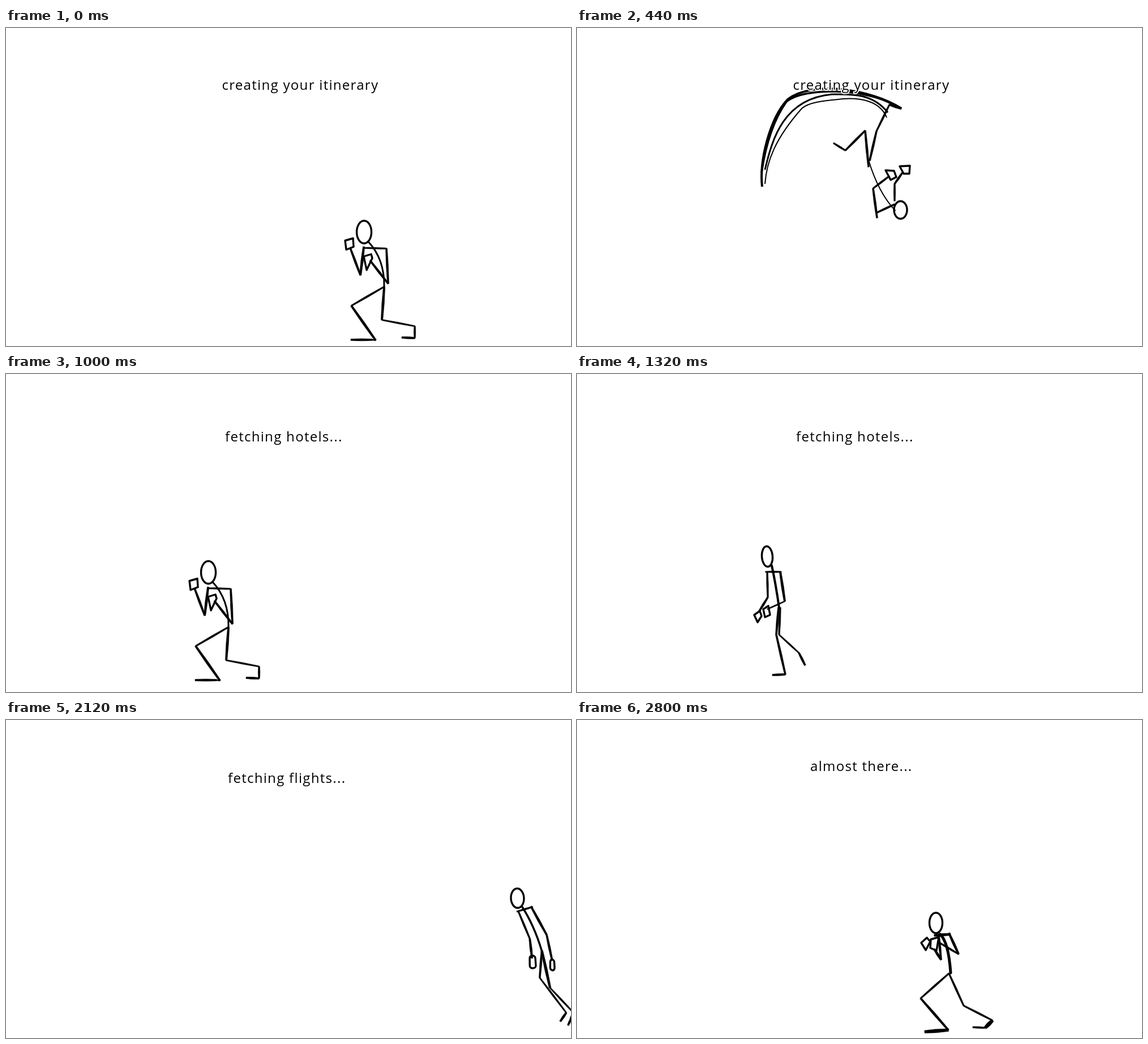
Animation, 998 px wide and 561 px high, one loop 2.84 s. Source, as an HTML page with a canvas:

```html
<!DOCTYPE html>
<html lang="en">
<head>
<meta charset="utf-8">
<title>Loading</title>
<style>
  html, body { margin: 0; width: 100%; height: 100%; overflow: hidden; background: #fff; }
  canvas, svg { position: absolute; left: 0; top: 0; width: 998px; height: 561px; }
  text {
    font: 500 24px "Open Sans", sans-serif;
    letter-spacing: 1.3px;
    stroke: #fff; stroke-width: 4px; stroke-linejoin: round;
    paint-order: stroke;
    visibility: hidden;
  }
</style>
</head>
<body>
<canvas width="998" height="561"></canvas>
<svg viewBox="0 0 998 561">
  <text x="381.5" y="109">creating your itinerary</text>
  <text x="387" y="119">fetching hotels...</text>
  <text x="392" y="110.5">fetching flights...</text>
  <text x="412" y="89.5">almost there...</text>
</svg>
<script>
const LOOP = 2840, STEP = 40;
const ctx = document.querySelector('canvas').getContext('2d');
const labels = [...document.querySelectorAll('text')];
const labelStarts = [0, 880, 1760, 2600];

// Makes a pose relative to its hip; dir -1 stores an upside-down drawing upright.
function pose(hip, parts, dir = 1) {
  const rel = list => list.map((v, i) => (v - hip[i % 2]) * dir);
  const out = { hip, weights: parts.weights, round: parts.round || 0 };
  for (const k of ['shoulders', 'spine', 'armA', 'armB', 'handA', 'handB', 'legA', 'legB']) {
    out[k] = rel(parts[k]);
  }
  out.head = [...rel(parts.head.slice(0, 2)), ...parts.head.slice(2)];
  return out;
}

// weights: torso [shoulders, spine], arms [upper, lower], legs [thigh, shin, heel, toe]
const guard = pose([667, 457], {
  head: [632.5, 360, 13, 20, 0],
  shoulders: [632, 388, 672, 389],
  spine: [640, 377, 669, 408, 668, 457],
  armA: [632, 386, 626, 436, 608, 388],
  armB: [672, 389, 675, 451, 643, 410],
  handA: [599, 375, 613, 371, 614, 386, 601, 391],
  handB: [632, 403, 645, 399, 647, 406, 637, 427],
  legA: [667, 457, 610, 490, 653, 551, 647, 550, 609, 550],
  legB: [668, 457, 664, 515, 722, 526, 722, 547, 699, 546],
  weights: { torso: [3, 3], armA: [4.5, 4], armB: [4, 4], legA: [3.5, 4.5, 2, 4], legB: [4.5, 3, 3.5, 4] }
});

const flip = pose([516, 235], {
  head: [571.5, 321, 11.5, 15.5, 0],
  shoulders: [529, 326, 561, 311],
  spine: [562, 322, 532, 290, 515, 233],
  armA: [561, 305, 561, 275, 575, 255],
  armB: [530, 335, 523, 283, 552, 261],
  handA: [570, 244, 588, 243, 587, 257, 577, 257],
  handB: [545, 251, 560, 252, 564, 263, 554, 268],
  legA: [517, 234, 529, 182, 552, 135, 552, 135, 573, 142],
  legB: [515, 245, 509, 181, 474, 216, 474, 216, 453, 203],
  weights: { torso: [3.5, 2], armA: [3.5, 4], armB: [4, 3.5], legA: [4, 3.5, 2, 5], legB: [4, 4, 2, 3.5] }
}, -1);

const fall = pose([421, 352], {
  head: [396, 251, 9, 16, 0],
  shoulders: [390, 276, 416, 273],
  spine: [403, 275, 414, 310, 421, 353],
  armA: [391, 277, 373, 236, 383, 211],
  armB: [417, 272, 402, 240, 407, 203],
  handA: [381, 196, 391, 196, 394, 209, 383, 204],
  handB: [402, 197, 405, 190, 415, 191, 414, 203],
  legA: [420, 351, 388, 372, 394, 427, 394, 427, 382, 437],
  legB: [421, 352, 420, 398, 440, 451, 435, 462, 421, 471],
  weights: { torso: [5, 5.5], armA: [4.5, 4], armB: [4, 4.5], legA: [3, 3, 2, 5], legB: [4, 5, 4, 5] }
});

const walk = pose([357, 412], {
  head: [336, 322, 9.5, 18, -.07],
  shoulders: [333, 349, 361, 349],
  spine: [344, 338, 351, 370, 357, 412],
  armA: [336, 349, 337, 394, 321, 420],
  armB: [359, 349, 367, 401, 336, 415],
  handA: [313, 425, 323, 418, 326, 427, 319, 438],
  handB: [329, 415, 338, 409, 341, 425, 332, 429],
  legA: [356, 412, 352, 460, 368, 530, 368, 530, 345, 531],
  legB: [359, 412, 357, 460, 392, 492, 392, 492, 403, 514],
  weights: { torso: [3, 4], armA: [3.5, 4], armB: [4.5, 2.5], legA: [4, 4, 2, 4], legB: [3.5, 3, 2, 4] }
});

const dash = pose([221, 387], {
  head: [173, 293, 11.5, 15.5, -.12],
  shoulders: [173, 319, 201, 305],
  spine: [180, 306, 200, 338, 221, 387],
  armA: [174, 319, 197, 374, 209, 411],
  armB: [198, 304, 224, 358, 240, 411],
  handA: [208, 408, 218, 406, 220, 428, 209, 431],
  handB: [238, 411, 244, 410, 245, 429, 239, 433],
  legA: [221, 387, 199, 431, 245, 485, 245, 485, 248, 512],
  legB: [222, 387, 260, 453, 299, 509, 290, 528, 277, 529],
  weights: { torso: [3, 3.5], armA: [3.5, 4], armB: [4.5, 4], legA: [4, 2.5, 2, 4.5], legB: [4.5, 2.2, 7, 3.5] },
  round: 5
});

const slow = pose([657, 420], {
  head: [622.5, 329, 11.5, 19.5, .06],
  shoulders: [620, 349, 648, 349],
  spine: [633, 348, 655, 380, 658, 420],
  armA: [626, 350, 641, 386, 633, 417],
  armB: [645, 349, 675, 393, 675, 425],
  handA: [624, 412, 633, 411, 634, 433, 623, 433],
  handB: [670, 423, 678, 422, 679, 441, 668, 441],
  legA: [657, 420, 636, 484, 682, 511, 682, 511, 690, 536],
  legB: [658, 420, 682, 473, 730, 546, 730, 546, 699, 544],
  weights: { torso: [3.5, 3.5], armA: [3.5, 4.5], armB: [4, 4], legA: [5.5, 4.5, 2, 4.5], legB: [3.5, 4, 2, 4] },
  round: 4
});

const run = pose([657, 447], {
  head: [634, 358, 11.5, 18, 0],
  shoulders: [631, 380, 660, 378],
  spine: [641, 378, 656, 390, 660, 446],
  armA: [639, 380, 643, 423, 631, 404],
  armB: [657, 376, 674, 413, 637, 391],
  handA: [608, 393, 618, 384, 624, 391, 616, 406],
  handB: [625, 387, 639, 383, 635, 407, 624, 402],
  legA: [657, 447, 607, 491, 656, 547, 656, 547, 614, 550],
  legB: [657, 447, 683, 504, 734, 530, 721, 543, 699, 542],
  weights: { torso: [5, 5], armA: [4, 4.5], armB: [4.5, 3.5], legA: [3.5, 4.5, 2, 6.5], legB: [3.5, 3.5, 7, 3.5] }
});

const swap = p => ({
  ...p, legA: p.legB, legB: p.legA,
  weights: { ...p.weights, legA: p.weights.legB, legB: p.weights.legA }
});

// [time, pose, hip, turn in degrees]
const keys = [
  [0, guard, guard.hip, 0],
  [120, swap(run), [622, 450], 0],
  [220, guard, [566, 456], 0],
  [340, flip, [520, 300], 95],
  [440, flip, flip.hip, 180],
  [560, flip, [472, 270], 285],
  [720, fall, fall.hip, 360],
  [840, guard, [400, 446], 360],
  [1000, guard, [392, 447], 360],
  [1160, slow, [377, 408], 360],
  [1320, walk, walk.hip, 360],
  [1440, swap(walk), [342, 414], 360],
  [1560, slow, [324, 407], 360],
  [1680, swap(dash), [299, 391], 360],
  [1800, dash, dash.hip, 360],
  [1900, swap(dash), [130, 390], 360],
  [2000, dash, [10, 390], 360],
  [2079, dash, [-90, 390], 360],
  [2080, dash, [1010, 400], 360],
  [2180, swap(slow), [850, 418], 360],
  [2280, slow, [726, 418], 360],
  [2360, swap(slow), [688, 420], 360],
  [2440, slow, slow.hip, 360],
  [2560, swap(run), [652, 436], 360],
  [2680, guard, [655, 450], 360],
  [2800, run, run.hip, 360],
  [2840, guard, guard.hip, 360]
];

// Swept foot, drawn from the tail: path and line width.
const sweep = [
  ['M327 280C322 235 340 160 372 126C415 92 520 108 573 142', 4],
  ['M326 255C332 215 345 165 370 130C400 104 510 106 560 136', 3.5],
  ['M332 250C345 195 365 125 450 117C480 117 520 113 549 149', 3],
  ['M332 275C335 235 350 195 397 142C410 130 440 128 470 125C500 123 535 128 547 158', 2]
].map(([d, w]) => [new Path2D(d), w]);

function mix(a, b, k) {
  if (typeof a === 'number') return a + (b - a) * k;
  if (Array.isArray(a)) return a.map((v, i) => mix(v, b[i], k));
  return Object.fromEntries(Object.keys(a).map(n => [n, mix(a[n], b[n], k)]));
}

// One pen stroke, fuller in the middle than at its ends.
function pen(x1, y1, x2, y2, w) {
  const len = Math.hypot(x2 - x1, y2 - y1);
  if (len < .5) return;
  const nx = (y1 - y2) / len * w, ny = (x2 - x1) / len * w;
  const mx = (x1 + x2) / 2, my = (y1 + y2) / 2, end = .36, mid = .62;
  ctx.beginPath();
  ctx.moveTo(x1 + nx * end, y1 + ny * end);
  ctx.quadraticCurveTo(mx + nx * mid, my + ny * mid, x2 + nx * end, y2 + ny * end);
  ctx.lineTo(x2 - nx * end, y2 - ny * end);
  ctx.quadraticCurveTo(mx - nx * mid, my - ny * mid, x1 - nx * end, y1 - ny * end);
  ctx.closePath();
  ctx.fill();
  ctx.lineWidth = .6;
  ctx.stroke();
}

function limb(p, weights) {
  weights.forEach((w, i) => pen(...p.slice(i * 2, i * 2 + 4), w));
}

function hand(p, r) {
  ctx.beginPath();
  ctx.moveTo((p[0] + p[6]) / 2, (p[1] + p[7]) / 2);
  for (let i = 0; i < 8; i += 2) {
    const n = (i + 2) % 8;
    ctx.arcTo(p[i], p[i + 1], (p[i] + p[n]) / 2, (p[i + 1] + p[n + 1]) / 2, r);
  }
  ctx.closePath();
  ctx.lineWidth = 3.4;
  ctx.stroke();
}

function figure(p, [x, y], turn) {
  const { weights: w } = p;
  ctx.save();
  ctx.translate(x, y);
  ctx.rotate(turn * Math.PI / 180);
  ctx.beginPath();
  ctx.ellipse(...p.head, 0, Math.PI * 2);
  ctx.lineWidth = 3.4;
  ctx.stroke();
  const [sx, sy, ...curve] = p.spine;
  ctx.beginPath();
  ctx.moveTo(sx, sy);
  ctx.quadraticCurveTo(...curve);
  ctx.lineWidth = w.torso[1];
  ctx.stroke();
  limb(p.shoulders, [w.torso[0]]);
  for (const k of ['armA', 'armB', 'legA', 'legB']) limb(p[k], w[k]);
  hand(p.handA, p.round);
  hand(p.handB, p.round);
  ctx.restore();
}

function drawSweep(t) {
  if (t < 340 || t >= 560) return;
  const len = 440;
  const from = Math.max(0, (t - 440) / 120) * len;
  const to = Math.min(1, (t - 320) / 120) * len;
  ctx.save();
  ctx.lineCap = 'butt';
  ctx.setLineDash([to - from, 1000]);
  ctx.lineDashOffset = -from;
  for (const [path, w] of sweep) {
    ctx.lineWidth = w;
    ctx.stroke(path);
  }
  ctx.restore();
}

function render(t) {
  ctx.clearRect(0, 0, 998, 561);
  ctx.lineCap = ctx.lineJoin = 'round';
  drawSweep(t);
  const i = keys.findLastIndex(k => k[0] <= t);
  const [t0, p0, hip0, turn0] = keys[i];
  const [t1, p1, hip1, turn1] = keys[i + 1];
  const k = (t - t0) / (t1 - t0);
  figure(mix(p0, p1, k), mix(hip0, hip1, k), mix(turn0, turn1, k));
  const current = labelStarts.findLastIndex(s => s <= t);
  labels.forEach((el, n) => { el.style.visibility = n === current ? 'visible' : 'hidden'; });
}

const start = performance.now();
function tick() {
  const t = (performance.now() - start) % LOOP;
  render(Math.floor(t / STEP) * STEP);
  requestAnimationFrame(tick);
}
tick();
</script>
</body>
</html>
```
